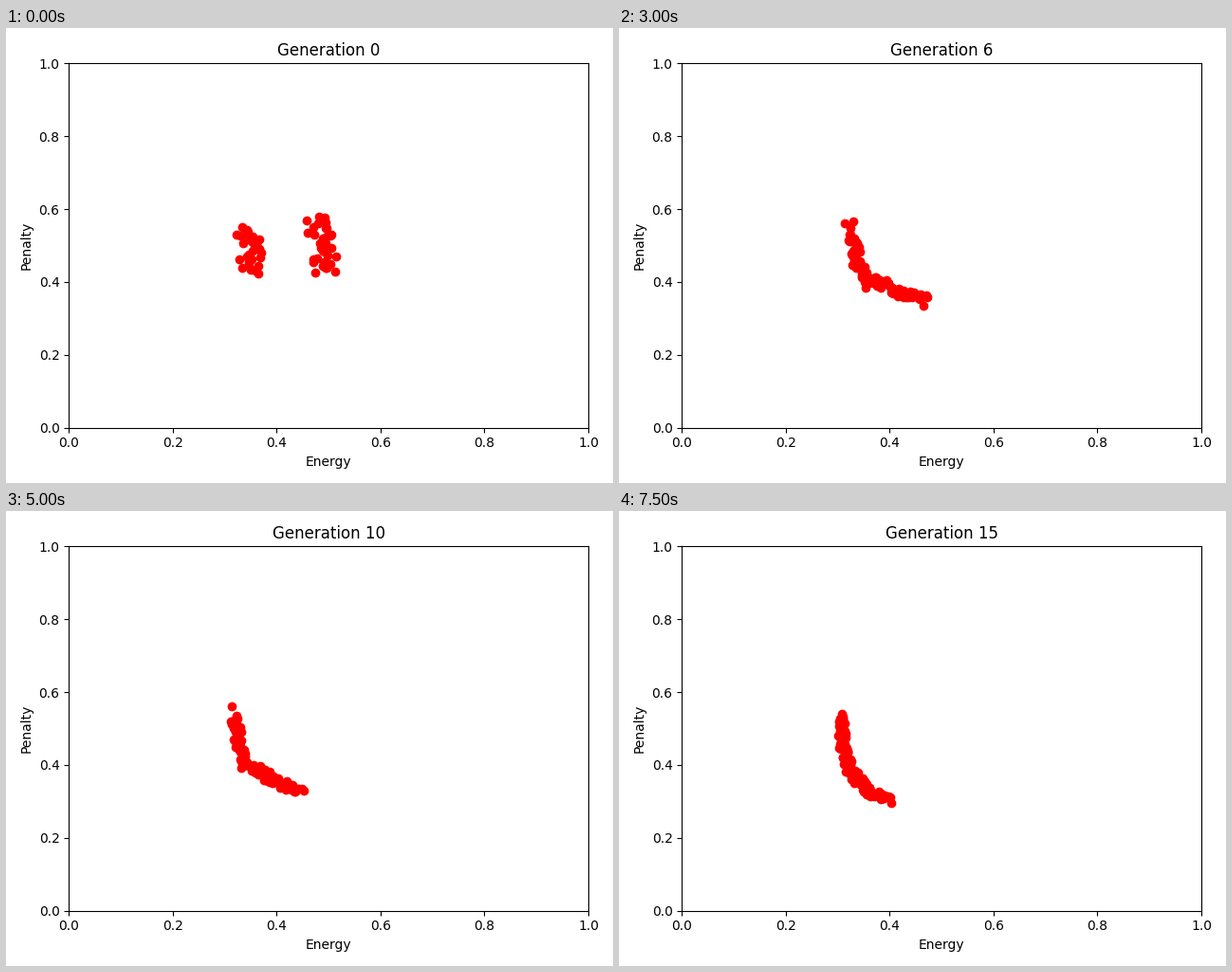
These frames come from a looping animation (640 by 480 pixels, 8 s). A matplotlib script:

```python
import numpy as np
import matplotlib.pyplot as plt
from matplotlib.animation import FuncAnimation

GENERATIONS = 16
INTERVAL = 500

# Key shapes of the Pareto front, in thousandths of the axis range.
EARLY = np.array([(344, 532), (350, 485), (359, 443), (378, 446),
                  (420, 440), (440, 418), (506, 431)])
MIDDLE = np.array([(320, 530), (327, 490), (330, 450), (345, 400),
                   (382, 382), (405, 358), (457, 337)])
LATE = np.array([(306, 536), (309, 480), (313, 435), (320, 390),
                 (342, 355), (358, 328), (400, 305)])

# Long-lived individuals away from the front: first, last, energy, penalty.
SURVIVORS = [(0, 6, 322, 530), (1, 6, 354, 384), (4, 6, 330, 566),
             (5, 9, 465, 334), (6, 12, 314, 560)]


def cluster(rng, count, energy, low, high):
    """Upright, slightly leaning cloud of starting individuals."""
    y = np.linspace(low, high, count) + rng.uniform(-5, 5, count)
    lean = 0.1 * ((low + high) / 2 - y)
    x = energy + lean + rng.triangular(-30, 0, 30, count)
    return np.column_stack([x, y])


def first_population():
    rng = np.random.default_rng(7)
    return np.vstack([cluster(rng, 28, 354, 422, 547),
                      cluster(rng, 34, 489, 424, 582)])


def front_at(gen):
    if gen <= 9:
        u = max(gen - 2, 0) / 7
        return EARLY + (MIDDLE - EARLY) * (1 - (1 - u) ** 1.8)
    return MIDDLE + (LATE - MIDDLE) * (gen - 9) / 6


def sample_front(gen, count):
    """Scatter individuals evenly along the front within a narrow band."""
    rng = np.random.default_rng(40 + gen)
    x, y = front_at(gen).T
    arc = np.r_[0, np.cumsum(np.hypot(np.diff(x), 0.7 * np.diff(y)))]
    arc /= arc[-1]
    t = np.linspace(0, 1, count)

    age = gen / (GENERATIONS - 1)
    top, tail = 12 - 6 * age, 6 + 4 * age
    spread = top + (tail - top) * t + 3 * np.sin(np.pi * t)
    radius = spread * np.sqrt(rng.random(count))
    radius[rng.random(count) < 0.05] *= 1.5
    angle = rng.uniform(0, 2 * np.pi, count)
    return np.column_stack([
        np.interp(t, arc, x) + radius * np.cos(angle),
        np.interp(t, arc, y) + 1.3 * radius * np.sin(angle),
    ])


def population(gen):
    parts = [[(x, y)] for first, last, x, y in SURVIVORS
             if first <= gen <= last]
    if gen > 0:
        parts.append(sample_front(gen, 45 if gen == 1 else 95))
    if gen < 2:
        parents = first_population()
        fit = parents.prod(axis=1) < 215_000
        parts.append(parents[fit] if gen else parents)
    return np.vstack(parts) / 1000


fig, ax = plt.subplots(figsize=(6.4, 4.8), dpi=100)
dots = ax.scatter([], [], color="red")
title = ax.set_title("Generation 0")
ax.set(xlim=(0, 1), ylim=(0, 1), xlabel="Energy", ylabel="Penalty")
fig.tight_layout()


def update(gen):
    dots.set_offsets(population(gen))
    title.set_text(f"Generation {gen}")
    return dots, title


anim = FuncAnimation(fig, update, frames=GENERATIONS, interval=INTERVAL,
                     repeat=True, repeat_delay=0)
plt.show()
```
